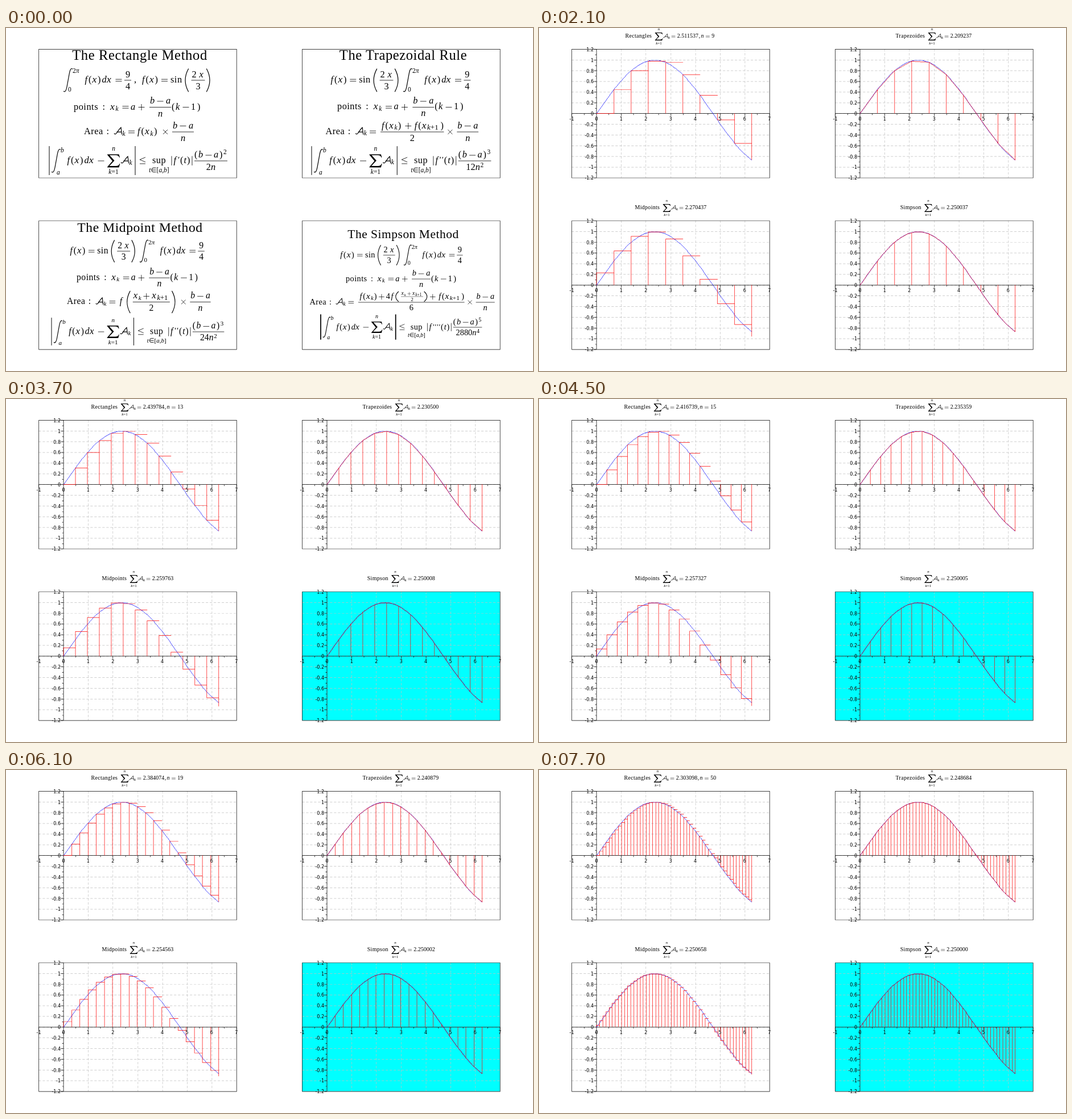
Animation, 926 px wide and 604 px high, one loop 8 s. Source, as an HTML page with a canvas:

```html
<!DOCTYPE html>
<html lang="en">
<head>
<meta charset="utf-8">
<title>Numerical integration methods</title>
<style>
html, body { margin: 0; width: 100%; height: 100%; overflow: hidden; background: #fff; }
canvas, svg { position: absolute; left: 0; top: 0; width: 926px; height: 604px; }
text { font-family: "Liberation Serif", "Noto Serif", serif; }
.i { font-style: italic; }
.m { text-anchor: middle; }
.e { text-anchor: end; }
.w { letter-spacing: .03em; }
.t { letter-spacing: .025em; text-anchor: middle; }
.l { font: 8px "DejaVu Sans", sans-serif; }
.s { fill: none; stroke: #000; stroke-width: .8; }
.b { stroke-width: 1.2; stroke-linecap: round; }
</style>
</head>
<body>
<canvas id="plot" width="926" height="604"></canvas>
<svg viewBox="0 0 926 604">
  <g id="formulas"></g>
  <g id="labels"></g>
  <g id="heads"></g>
</svg>
<script>
const $ = id => document.getElementById(id);
const ctx = $('plot').getContext('2d');
const BODY = 16.4, SMALL = 11.5, TAU = 2 * Math.PI;
const origins = [[0, 0], [463, 0], [0, 302], [463, 302]];

// ---------- math typesetting: x in px, y relative to the math axis ----------
const txt = (s, x, y = 4, size = BODY, cls = '') =>
  `<text x="${x}" y="${y}" font-size="${size}" class="${cls}">${s}</text>`;
const it = (s, x, y, size) => txt(s, x, y, size, 'i');
const mid = (s, x, y, size, cls = '') => txt(s, x, y, size, 'm ' + cls);
const path = (d, x = 0, y = 0, cls = '') =>
  `<path class="s ${cls}" transform="translate(${x} ${y})" d="${d}"/>`;
const group = (x, y, k, body) =>
  `<g transform="translate(${x} ${y}) scale(${k})">${body}</g>`;

const shapes = {
  '-': 'M-5.5 0H5.5',
  '+': 'M-5.5 0H5.5M0-5.5V5.5',
  '=': 'M-5.5-1.7H5.5M-5.5 1.7H5.5',
  'x': 'M-4-4L4 4M4-4L-4 4',
  '<': 'M5-6.3L-5-2.2L5 2M-5 5H5'
};
const op = (c, x, y = 0) => path(shapes[c], x, y);
const bar = (x, w, y = 0) => path(`M0 0H${w}`, x, y);
const pole = (x, w = 1) => `<path class="s" style="stroke-width:${w}" d="M${x}-26V25"/>`;
const open = (x, h, y = 0) => path(`M7 ${-h}Q-4 0 7 ${h}`, x, y, 'b');
const close = (x, h, y = 0) => path(`M0 ${-h}Q11 0 0 ${h}`, x, y, 'b');
const calA = x => path('M.3 3q2.2 2 4.5-1.5Q9.5-6 12-7.8L13.4 4M4.8 .2H12.6', x, 0, 'b');
const areaK = x => calA(x) + it('k', x + 14.5, 6.5, SMALL);
const integral = (x, lo, hi) =>
  path('M1.5 19.5q3.5 2.5 5.5-8L11.5-13q2-9.5 5-7', x, 0, 'b') + lo + hi;
const sum = x =>
  `<path transform="translate(${x})" d="M-11-11.5H9.5L11-6H10Q9-10 4-10H-7L1.5-.5L-7.5 9H4Q9.5 9 10.3 5H11.3L9.5 11.5H-11V10.8L-2 .3L-11-10.8Z"/>` +
  mid('n', x, -18, SMALL, 'i') + mid('<tspan class="i">k</tspan>=1', x, 23, SMALL);

const fOfX = x => it('f', x + 1.5) + txt('(', x + 8) + it('x', x + 14.5, 4, 17.5) + txt(')', x + 24);
const fxdx = x => fOfX(x) + it('d', x + 31.5) + it('x', x + 40, 4, 17.5);
const xSub = (x, sub, y = 4) => it('x', x, y, 17.5) +
  txt(sub.replace('k', '<tspan class="i">k</tspan>'), x + 9.5, y + 2.5, sub === 'k' ? SMALL : 13);
const fSub = (x, sub, y = 4) => it('f', x + 1, y) + txt('(', x + 7.5, y) +
  xSub(x + 14, sub, y) + txt(')', x + (sub === 'k' ? 30 : 47), y);
const stepFrac = x => bar(x, 38) + it('b', x + 1, -6.5) + op('-', x + 19, -10.5) +
  it('a', x + 29, -6.5) + mid('n', x + 19, 16, BODY, 'i');

const integralPart = integral(0, txt('0', 9, 20, SMALL),
    txt('2<tspan class="i">π</tspan>', 17, -13, SMALL)) +
  fxdx(37) + op('=', 98) + bar(108, 12) + mid('9', 114, -5.5) + mid('4', 114, 16);
const sinePart = fOfX(0) + op('=', 41) + txt('sin', 51.5, 4, BODY, 'w') + open(76, 20) +
  bar(88, 24) + txt('2', 89, -5.5) + it('x', 102, -5.5) + mid('3', 100, 16) + close(115, 20);
const pointsRow = txt('points', 0, 4, BODY, 'w') + txt(':', 50.5) + xSub(64, 'k') +
  op('=', 91) + it('a', 100) + op('+', 119) + stepFrac(133) + txt('(', 172) +
  it('k', 179) + op('-', 197) + txt('1', 206) + txt(')', 217);
const areaHead = txt('Area', 0, 4, BODY, 'w') + txt(':', 39.5) + areaK(53) + op('=', 83.5);

const areaRows = [
  fSub(93, 'k') + op('x', 143) + stepFrac(155),
  bar(97, 112) + fSub(98, 'k', -6.5) + op('+', 146, -10.5) + fSub(156, 'k+1', -6.5) +
    mid('2', 153, 16) + op('x', 220) + stepFrac(232),
  it('f', 97) + open(109, 20) + bar(121, 68) + xSub(122, 'k', -6.5) + op('+', 146, -10.5) +
    xSub(156, 'k+1', -6.5) + mid('2', 155, 16) + close(193, 20) + op('x', 214) + stepFrac(226),
  bar(98, 214) + fSub(100, 'k', -7) + op('+', 145, -11) + txt('4', 154, -7) + it('f', 164, -7) +
    open(172, 10, -11.5) + group(184, -11.5, .64,
      bar(0, 70) + xSub(1, 'k', -5) + op('+', 26, -9) + xSub(36, 'k+1', -5) + mid('2', 35, 15)) +
    close(231, 10, -11.5) + op('+', 248, -11) + fSub(259, 'k+1', -7) +
    mid('6', 205, 16) + op('x', 323) + stepFrac(335)
];

function errorRow(primes, coef, power, heavy) {
  const shift = 4 * (primes - 1), fx = 255 + shift;
  const w = coef.length * 8.2 + 8.2 + (power > 1 ? 6 : 0);
  const nx = fx + 29 - w / 2 + coef.length * 8.2;
  let s = pole(0, heavy) + integral(3, it('a', 13, 24, SMALL), it('b', 20, -15, SMALL)) +
    fxdx(30) + op('-', 91) + sum(113) + areaK(126) + pole(151, heavy) + op('<', 164) +
    mid('sup', 193, 4, BODY, 'w') +
    mid('<tspan class="i">t</tspan>∈[<tspan class="i">a,b</tspan>]', 193, 20, SMALL) +
    path('M0-8.5V8', 215) + it('f', 218.5);
  for (let p = 0; p < primes; p++) s += txt('′', 226 + 4 * p, 3, 15);
  s += txt('(', 230 + shift) + it('t', 236.5 + shift) + txt(')', 242 + shift) +
    path('M0-8.5V8', 251 + shift) + bar(fx, 58) + txt('(', fx, -6) + it('b', fx + 7, -6) +
    op('-', fx + 25, -10) + it('a', fx + 34, -6) + txt(')', fx + 44, -6) +
    txt(primes === 1 ? 2 : primes === 2 ? 3 : 5, fx + 51, -12, SMALL) +
    txt(coef, nx - coef.length * 8.2, 16) + it('n', nx, 16);
  if (power > 1) s += txt(power, nx + 9, 11, SMALL);
  return s;
}

// at: [x, y] of the sine, integral, points, area and error parts
const cards = [
  { title: 'The Rectangle Method', cx: 235, y: 56, k: 1, err: errorRow(1, '2', 1, 1),
    at: [[237.5, 92], [100, 92], [119, 139.5], [137, 183], [76, 234]] },
  { title: 'The Trapezoidal Rule', cx: 698, y: 55.5, k: .995, err: errorRow(2, '12', 2, 1),
    at: [[569, 92], [697, 92], [582, 139.5], [561.5, 183], [537, 234]] },
  { title: 'The Midpoint Method', cx: 235.5, y: 358.5, k: .957, err: errorRow(2, '24', 2, 1),
    at: [[111, 393], [234, 393], [124, 440], [107, 482.5], [80, 535]] },
  { title: 'The Simpson Method', cx: 698, y: 370, k: .872, err: errorRow(4, '2880', 4, 2),
    at: [[586, 400], [698, 400], [597, 442], [533.5, 483], [553, 527]] }
];
$('formulas').innerHTML = cards.map((c, p) => {
  const parts = [sinePart, integralPart, pointsRow, areaHead + areaRows[p], c.err];
  return txt(c.title, c.cx, c.y, 24.6 * c.k, 't') +
    parts.map((body, j) => group(...c.at[j], c.k, body)).join('');
}).join('') + txt(',', 225, 96);

// ---------- charts: hard pixels on a finer raster, scaled down smoothly ----------
const FINE = 1.43;
const f = x => Math.sin(2 * x / 3);
const px = x => 57.875 + (x + 1) * 43.40625;
const py = y => 37.75 + (1.2 - y) * 94.375;
const col = x => Math.floor(px(x) * FINE);
const row = y => Math.floor(py(y) * FINE + 1e-6);

$('labels').innerHTML = origins.map(([ox, oy]) => {
  let s = '';
  const label = (v, x, y, cls) => s += `<text class="l ${cls}" x="${ox + x}" y="${oy + y}">${v}</text>`;
  for (let x = -1; x <= 7; x++) label(x, px(x) - .3, 163, 'm');
  for (let j = -6; j <= 6; j++) label(j / 5, 96, py(j / 5) + 3, 'e');
  return s;
}).join('');

const dot = (x, y, w = 1, h = 1) => ctx.rect(x, y, w, h);
function ink(color, shape) {
  ctx.beginPath();
  shape();
  ctx.fillStyle = color;
  ctx.fill();
}

function line(x0, y0, x1, y1) {
  const n = Math.max(Math.abs(x1 - x0), Math.abs(y1 - y0)) || 1;
  for (let j = 0; j <= n; j++)
    dot(Math.round(x0 + (x1 - x0) * j / n), Math.round(y0 + (y1 - y0) * j / n));
}
const seg = (xa, ya, xb, yb) => line(col(xa), row(ya), col(xb), row(yb));
function curve(fn, a, b, n) {
  for (let j = 0; j < n; j++) {
    const u = a + (b - a) * j / n, v = a + (b - a) * (j + 1) / n;
    seg(u, fn(u), v, fn(v));
  }
}
function stem(x, y) {
  const zero = row(0), end = row(y);
  dot(col(x), Math.min(zero, end), 1, Math.abs(end - zero));
}
const left = col(-1), right = col(7), top0 = row(1.2), low = row(-1.2);
function box() {
  dot(left, top0, right - left + 1);
  dot(left, low, right - left + 1);
  dot(left, top0, 1, low - top0);
  dot(right, top0, 1, low - top0);
}
function grid() {
  for (let x = 0; x < 7; x++)
    for (let y = top0; y < low; y += 10) dot(col(x), y, 1, Math.min(6, low - y));
  for (let j = -5; j <= 5; j++)
    for (let x = left; x < right; x += 10) dot(x, row(j / 5), Math.min(6, right - x));
}
function axes() {
  const x0 = col(0), y0 = row(0);
  dot(left, y0, right - left);
  dot(x0, top0, 1, low - top0);
  for (let j = -12; j <= 12; j++) {
    const len = j % 2 ? 3 : 6;
    dot(x0 - len, row(j / 10), len);
  }
  for (let j = -2; j <= 14; j++) dot(col(j / 2), y0, 1, j % 2 ? 4 : 7);
}

function marks(p, n) {
  const h = TAU / n;
  for (let k = 0; k <= n; k++) {
    const a = k * h, b = a + h, m = a + h / 2, y = p === 2 ? f(m) : f(a);
    stem(a, y);
    if (k === n) break;
    if (p === 0 || p === 2) seg(a, y, b, y);
    else if (p === 1) seg(a, f(a), b, f(b));
    else curve(x => {
      const u = (x - a) / h;
      return f(a) * (1 - u) * (1 - 2 * u) + 4 * f(m) * u * (1 - u) + f(b) * u * (2 * u - 1);
    }, a, b, Math.ceil(100 / n));
  }
}

function sums(n) {
  const h = TAU / n;
  let rect = 0, centre = 0;
  for (let k = 0; k < n; k++) {
    rect += h * f(k * h);
    centre += h * f((k + .5) * h);
  }
  const trap = rect + h * (f(TAU) - f(0)) / 2;
  return [rect, trap, centre, (trap + 2 * centre) / 3];
}

const names = ['Rectangles', 'Trapezoides', 'Midpoints', 'Simpson'];
function head(p, n, value) {
  const x = [n < 10 ? 210.5 : 208.5, 690.5, 224.5, 684][p];
  let s = txt(names[p], -20, 4, BODY, 'w e') + sum(0) + areaK(12.5) + op('=', 42) +
    txt(value.toFixed(6), 53);
  if (p === 0) s += txt(',', 115) + it('n', 121.5) + op('=', 141) + txt(n, 152);
  return group(x, origins[p][1] + 15, .61, s);
}

function draw(n) {
  ctx.clearRect(0, 0, 926, 604);
  const values = n ? sums(n) : [];
  origins.forEach(([ox, oy], p) => {
    ctx.save();
    ctx.scale(1 / FINE, 1 / FINE);
    ctx.translate(Math.round(ox * FINE), Math.round(oy * FINE));
    if (n) {
      if (Math.abs(values[p] - 2.25) < 1e-5)
        ink('#0ff', () => dot(left, top0, right - left, low - top0));
      ink('#c0c0c0', grid);
      ink('#000', axes);
      ink('#00f', () => curve(f, 0, TAU, 100));
      ink('#f00', () => marks(p, n));
    }
    ink('#000', box);
    ctx.restore();
  });
  $('formulas').style.display = n ? 'none' : '';
  $('labels').style.display = n ? '' : 'none';
  $('heads').innerHTML = values.map((v, p) => head(p, n, v)).join('');
}

// opening card, then n = 5..20, 30, 40, 50
function countAt(t) {
  if (t < 500) return 0;
  const step = Math.floor((t - 500) / 400);
  return step < 16 ? 5 + step : 20 + 10 * (step - 15);
}

const start = performance.now();
let shown = -1;
function tick() {
  const n = countAt((performance.now() - start) % 8000);
  if (n !== shown) draw(shown = n);
  requestAnimationFrame(tick);
}
tick();
</script>
</body>
</html>
```
